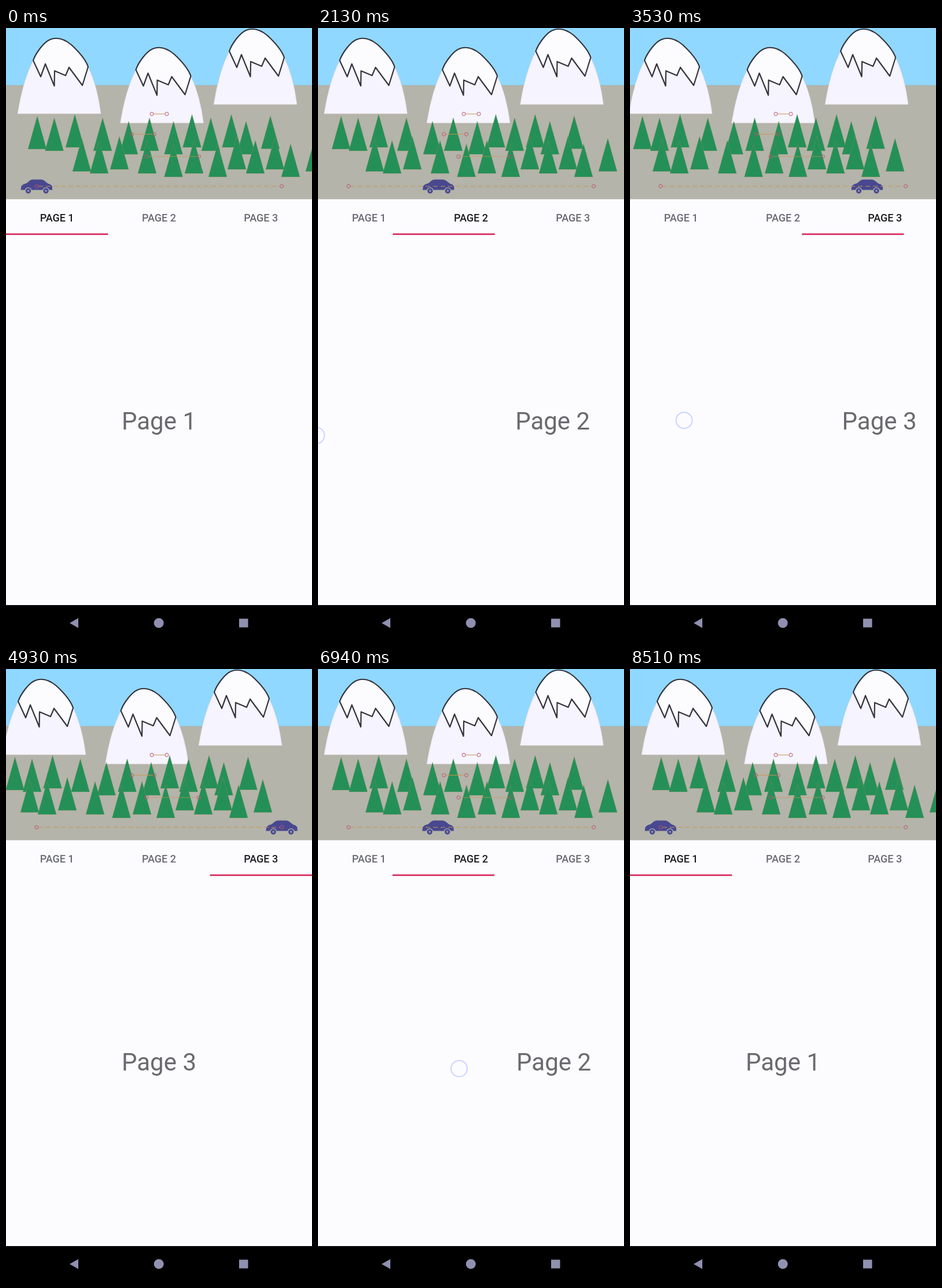
An HTML page with a canvas for the animation above (9450 ms loop, 529x1058 px).

```html
<!DOCTYPE html>
<html lang="en">
<head>
<meta charset="utf-8">
<title>Pager parallax</title>
<style>
html, body { margin: 0; width: 100%; height: 100%; overflow: hidden; background: #fcfcff; }
#stage { position: relative; width: 529px; height: 1058px; overflow: hidden; }
canvas { position: absolute; left: 0; top: 0; }
.tab, .page { position: absolute; text-align: center; white-space: nowrap; font-family: Roboto, sans-serif; }
.tab { top: 317px; width: 176.33px; font-size: 18px; line-height: 21px; font-weight: 500; }
.page { left: 0; top: 654px; width: 529px; font-size: 42px; line-height: 50px; color: #6a6a6e; }
#ring { position: absolute; left: -15px; top: -15px; width: 30px; height: 30px; box-sizing: border-box;
  border: 2px solid #ccd4ff; border-radius: 50%; }
</style>
</head>
<body>
<div id="stage"><canvas id="view" width="529" height="1058"></canvas></div>
<script>
const W = 529, H = 1058, LOOP = 9450;
const SKY = '#90d8ff', GROUND = '#b4b4aa', PAPER = '#fcfcff', CAR = '#484890';
const stage = document.getElementById('stage');
const ctx = document.getElementById('view').getContext('2d');

function add(cls, text) {
  const el = document.createElement('div');
  el.className = cls;
  el.textContent = text;
  stage.append(el);
  return el;
}
const tabs = [1, 2, 3].map(n => add('tab', 'PAGE ' + n));
const pages = [1, 2, 3].map(n => add('page', 'Page ' + n));
tabs.forEach((el, i) => { el.style.left = i * W / 3 + 'px'; });
const ring = add('', '');
ring.id = 'ring';

const pow = n => u => u ** n;
const inOut = u => 0.5 - 0.5 * Math.cos(Math.PI * u);
const outSine = u => Math.sin(u * Math.PI / 2);
const outQuart = u => 1 - (1 - u) ** 4;
const outCubic = u => 1 - (1 - u) ** 3;
const mix = (a, b, u) => a + (b - a) * u;

// Pager position: start ms, end ms, from, to, easing
const moves = [
  [40, 1520, 0, 0.306, pow(1.4)],
  [1520, 2130, 0.306, 0.731, pow(1.25)],
  [2130, 2630, 0.731, 1, outQuart],
  [3000, 3740, 1, 1.84, inOut],
  [3940, 4680, 1.84, 2, outCubic],
  [5220, 5960, 2, 1.2, inOut],
  [5960, 6370, 1.2, 1, outCubic],
  [6740, 7560, 1, 0.28, outSine],
  [8050, 8510, 0.28, 0, outCubic]
];

// Finger: down ms, up ms, x at whole page, page, y from, y to
const touches = [
  [40, 2170, 385, 0, 667, 704],
  [3000, 3980, 456, 1, 688, 668],
  [5220, 6000, 90, 2, 688, 684],
  [6740, 8080, 101, 1, 690, 688]
];

function position(t) {
  let p = 0;
  for (const [a, b, from, to, ease] of moves) {
    if (t < a) break;
    p = t >= b ? to : mix(from, to, ease((t - a) / (b - a)));
  }
  return p;
}

function shape(points, fill) {
  ctx.beginPath();
  points.forEach(([x, y]) => ctx.lineTo(x, y));
  ctx.closePath();
  ctx.fillStyle = fill;
  ctx.fill();
}

function rect(x, y, w, h, fill) {
  ctx.fillStyle = fill;
  ctx.fillRect(x, y, w, h);
}

function dot(x, y, r, fill) {
  ctx.beginPath();
  ctx.arc(x, y, r, 0, 7);
  ctx.fillStyle = fill;
  ctx.fill();
}

const slope = new Path2D('M20 148Q29 91 47 56C52 42 66 24 76 20C88 15 101 19 113 29C127 42 138 55 142 67Q158 100 164 148Z');
const cap = new Path2D('M47 56C52 42 66 24 76 20C88 15 101 19 113 29C127 42 138 55 142 67L132 99L109 68L103 82L84 74L83.5 100L68 62L60 84Z');
const body = new Path2D('M-27 279.5L-26 273Q-23 269 -17 268L-11 263Q-9 261.5 -6 261.5L8 261.5Q11 261.5 13 263L20 268.5Q26 269.5 27.5 274L27.5 279.5Z');

function mountain(x, y) {
  ctx.save();
  ctx.translate(x, y);
  ctx.fillStyle = '#f5f4ff';
  ctx.fill(slope);
  ctx.strokeStyle = '#dccfd6';
  ctx.lineWidth = 0.6;
  ctx.stroke(slope);
  ctx.fillStyle = PAPER;
  ctx.fill(cap);
  ctx.strokeStyle = '#34343c';
  ctx.lineWidth = 2.2;
  ctx.lineJoin = 'round';
  ctx.stroke(cap);
  ctx.restore();
}

const backTrees = [[54, 152], [83.5, 155], [119, 149], [167, 155], [212, 161], [248, 155],
  [289.5, 161], [321.5, 149], [354, 155], [389.5, 149], [415, 161], [457, 151.5]];
const frontTrees = [[131, 190.5], [161, 194], [196, 187], [244, 194], [289.5, 200], [325, 194],
  [366, 200], [399, 187], [431, 194], [465, 187], [492, 200], [534, 190.5]];

function trees(list, dx) {
  for (const [x, y] of list) {
    shape([[x + dx, y], [x + dx + 16, y + 57], [x + dx - 16, y + 57]], '#249058');
    ctx.strokeStyle = 'rgba(150,140,80,.55)';
    ctx.lineWidth = 0.6;
    ctx.stroke();
  }
}

function car(x) {
  ctx.save();
  ctx.translate(x, 0);
  ctx.fillStyle = CAR;
  ctx.fill(body);
  for (const wx of [-14, 16.5]) {
    dot(wx, 281, 6, GROUND);
    dot(wx, 281, 4.7, CAR);
    dot(wx, 281, 2, '#8c8cac');
  }
  ctx.restore();
}

function track(x1, x2, y, dash) {
  ctx.lineWidth = 1;
  ctx.strokeStyle = '#c89450';
  ctx.setLineDash(dash);
  ctx.beginPath();
  ctx.moveTo(x1 + 3, y);
  ctx.lineTo(x2 - 3, y);
  ctx.stroke();
  ctx.setLineDash([]);
  ctx.strokeStyle = '#c05070';
  for (const x of [x1, x2]) {
    ctx.beginPath();
    ctx.arc(x, y, 3, 0, 7);
    ctx.stroke();
  }
}

function scene(u) {
  rect(0, 0, W, H, PAPER);
  rect(0, 0, W, 99, SKY);
  rect(0, 99, W, 196.5, GROUND);
  rect(0, 98.6, W, 0.8, '#a8aca8');
  const far = -26 * u;
  mountain(far, 0);
  mountain(far + 177.5, 16);
  mountain(far + 339, -16);
  trees(backTrees, -38.5 * u);
  trees(frontTrees, -90 * u);
  car(52.5 + 423.7 * u);
  track(252, 278, 148.3, []);
  track(217.5, 256.5, 183.3, []);
  track(243, 333.3, 221.8, [2, 1]);
  track(53, 476.7, 273.2, [8, 5]);
  rect(W * 2 / 3 * u, 354.5, W / 3, 2.7, '#d8285a');
  rect(0, 996, W, 62, '#000');
  const icon = '#9090b0';
  shape([[110, 1027], [125, 1018.5], [125, 1035.5]], icon);
  dot(264.2, 1027, 8.5, icon);
  rect(403, 1019.5, 15.5, 15, icon);
}

function render(t) {
  const p = position(t);
  scene(p / 2);
  tabs.forEach((el, i) => { el.style.color = i === Math.round(p) ? '#1c1c20' : '#6a6a74'; });
  pages.forEach((el, i) => { el.style.transform = `translateX(${(i - p) * W}px)`; });
  const hit = touches.find(([a, b]) => t >= a && t < b);
  ring.style.display = hit ? 'block' : 'none';
  if (hit) {
    const [a, b, x, page, y1, y2] = hit;
    ring.style.transform = `translate(${x + (page - p) * W}px, ${mix(y1, y2, (t - a) / (b - a))}px)`;
  }
}

const start = performance.now();
function tick() {
  render((performance.now() - start) % LOOP);
  requestAnimationFrame(tick);
}
tick();
</script>
</body>
</html>
```
